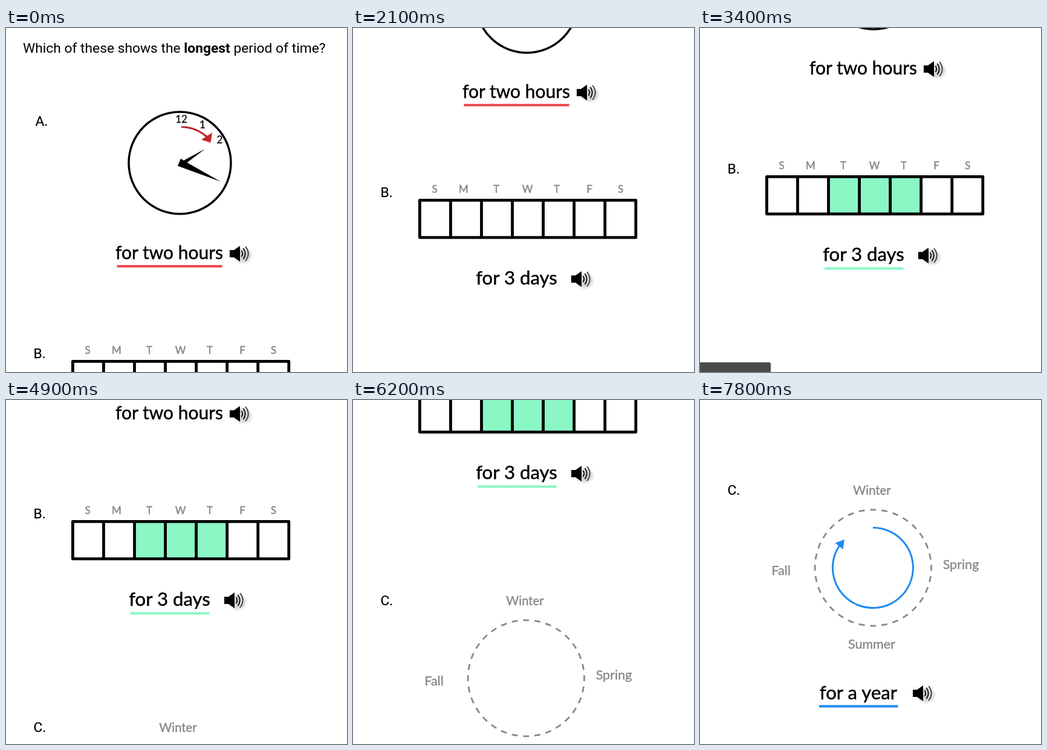
Recreate the animation shown at these times as an HTML page. Size 564x570 px, loop 8 s.

```html
<!DOCTYPE html>
<html lang="en">
<head>
<meta charset="utf-8">
<title>Periods of time</title>
<style>
  html, body { margin: 0; width: 100%; height: 100%; overflow: hidden; background: #fff; }
  svg { display: block; }
  text { font-family: Lato, sans-serif; }
  .plain text { font-family: Roboto, sans-serif; font-size: 22.8px; }
  .label { stroke: #000; stroke-width: .25; }
  .phrase { font-size: 31.2px; stroke: #000; stroke-width: .45; text-anchor: middle; }
  .season { font-size: 21.5px; fill: #888; stroke: #888; stroke-width: .4; text-anchor: middle; }
  .day { font-size: 17px; fill: #888; stroke: #888; stroke-width: .5; text-anchor: middle; }
  .hour { font-size: 17px; stroke: #000; stroke-width: .25; text-anchor: middle; }
  .line { fill: none; }
</style>
</head>
<body>
<svg width="564" height="570" viewBox="0 0 564 570">
  <defs>
    <filter id="soft" x="-50%" y="-50%" width="200%" height="200%"><feGaussianBlur stdDeviation="2"/></filter>
    <g id="speaker">
      <ellipse cx="22" cy="3" rx="14" ry="12" fill="#000" opacity=".16" filter="url(#soft)"/>
      <path d="M0-6H7L17-13V13L7 6H0Z"/>
      <path class="line" stroke="#111" stroke-width="2" d="M19.500-5Q23 0 19.500 5M22.500-9Q29 0 22.500 9"/>
      <path class="line" stroke="#333" stroke-width="1.7" d="M26-12Q35.500 0 26 12"/>
    </g>
  </defs>
  <g id="page">
    <g class="plain">
      <text x="28" y="41">Which of these shows the <tspan font-weight="700">longest</tspan> period of time?</text>
      <text class="label" x="48.500" y="162">A.</text>
      <text class="label" x="45.500" y="547">B.</text>
      <text class="label" x="45.500" y="901">C.</text>
    </g>

    <circle class="line" cx="287.500" cy="223.500" r="84.500" stroke="#000" stroke-width="3.500"/>
    <text class="hour" x="290" y="157">12</text>
    <text class="hour" x="325" y="166">1</text>
    <text class="hour" x="353.500" y="190.500">2</text>
    <path class="line" stroke="#c1272d" stroke-width="3.200" d="M290 164Q313 164 332 180"/>
    <path fill="#c1272d" d="M341 173.500L338.500 190L323 185Z"/>
    <path d="M289 216.500L294 219.500L329 200.500L299.500 223L355 254.500L284 228.500Z"/>
    <text class="phrase" x="270" y="383" style="font-size:30px">for two hours</text>
    <use href="#speaker" x="370" y="374"/>
    <path id="markA" stroke="#e8474d" stroke-width="4" d="M183.500 394.700H357.500"/>

    <g id="days"></g>
    <g id="markB">
      <path fill="#8af7c5" d="M212 552H366V614H212Z"/>
      <path stroke="#8af7c5" stroke-width="4" d="M206 704.500H336.500"/>
    </g>
    <path id="grid" class="line" stroke="#000" stroke-width="4.800" stroke-linejoin="round"/>
    <text class="phrase" x="270.500" y="692">for 3 days</text>
    <use href="#speaker" x="361" y="683"/>

    <circle class="line" cx="286.300" cy="1022" r="96.200" stroke="#888" stroke-width="2.800"
      pathLength="64" stroke-dasharray="1.050 .950" stroke-dashoffset=".525"/>
    <text class="season" x="284.500" y="901" style="font-size:20.3px">Winter</text>
    <text class="season" x="431.500" y="1024">Spring</text>
    <text class="season" x="284" y="1156">Summer</text>
    <text class="season" x="134" y="1034">Fall</text>
    <g id="markC">
      <path class="line" stroke="#1f8bee" stroke-width="3" d="M286 955.500A66.500 66.500 0 1 1 231 984.500"/>
      <path fill="#1f8bee" d="M239 975L223.500 981L236.500 991.500Z"/>
      <path stroke="#1f8bee" stroke-width="4" d="M197 1251.500H327.500"/>
    </g>
    <text class="phrase" x="262" y="1240">for a year</text>
    <use href="#speaker" x="352" y="1230"/>
  </g>
  <path id="status" fill="#4a4a4a" d="M0 554H114Q117 554 117 557V570H0Z"/>
</svg>
<script>
const get = id => document.getElementById(id);
const show = (id, on) => get(id).setAttribute('visibility', on ? 'visible' : 'hidden');

const LOOP = 8000, TICK = 100;
// Each flick: first tick, then the page offset at every following tick.
const flicks = [
  [0, 0],
  [2, 8, 28, 54, 75, 89, 97, 100, 102],
  [11, 103, 105, 106],
  [18, 128, 195, 250, 267],
  [30, 271, 280, 291, 300, 306, 310, 312],
  [47, 320, 335, 351, 376, 402, 427, 448, 462, 470],
  [59, 484, 510, 537, 561, 581, 597, 609, 617, 622],
  [68, 636, 661, 688, 709, 724, 734, 740, 743, 744]
];

function offset(tick) {
  const [start, ...steps] = flicks.findLast(f => f[0] <= tick);
  return steps[Math.min(tick - start, steps.length - 1)];
}

const left = 110.4, upper = 552.4, right = 467.8, lower = 614.2;
let grid = `M${left} ${upper}H${right}V${lower}H${left}Z`;
for (let i = 1; i < 7; i++) grid += `M${left + i * (right - left) / 7} ${upper}V${lower}`;
get('grid').setAttribute('d', grid);

const dayX = [135, 183, 237, 288.5, 337, 391, 442.5];
get('days').innerHTML = dayX.map((x, i) => `<text class="day" x="${x}" y="540">${'SMTWTFS'[i]}</text>`).join('');

function draw(now) {
  const tick = Math.floor(now % LOOP / TICK);
  get('page').setAttribute('transform', `translate(0 ${-offset(tick)})`);
  show('markA', tick < 31);
  show('markB', tick >= 31 && tick < 70);
  show('markC', tick >= 70);
  show('status', tick >= 33 && tick < 36);
}

const begin = performance.now();
function frame() {
  draw(performance.now() - begin);
  requestAnimationFrame(frame);
}
frame();
</script>
</body>
</html>
```
